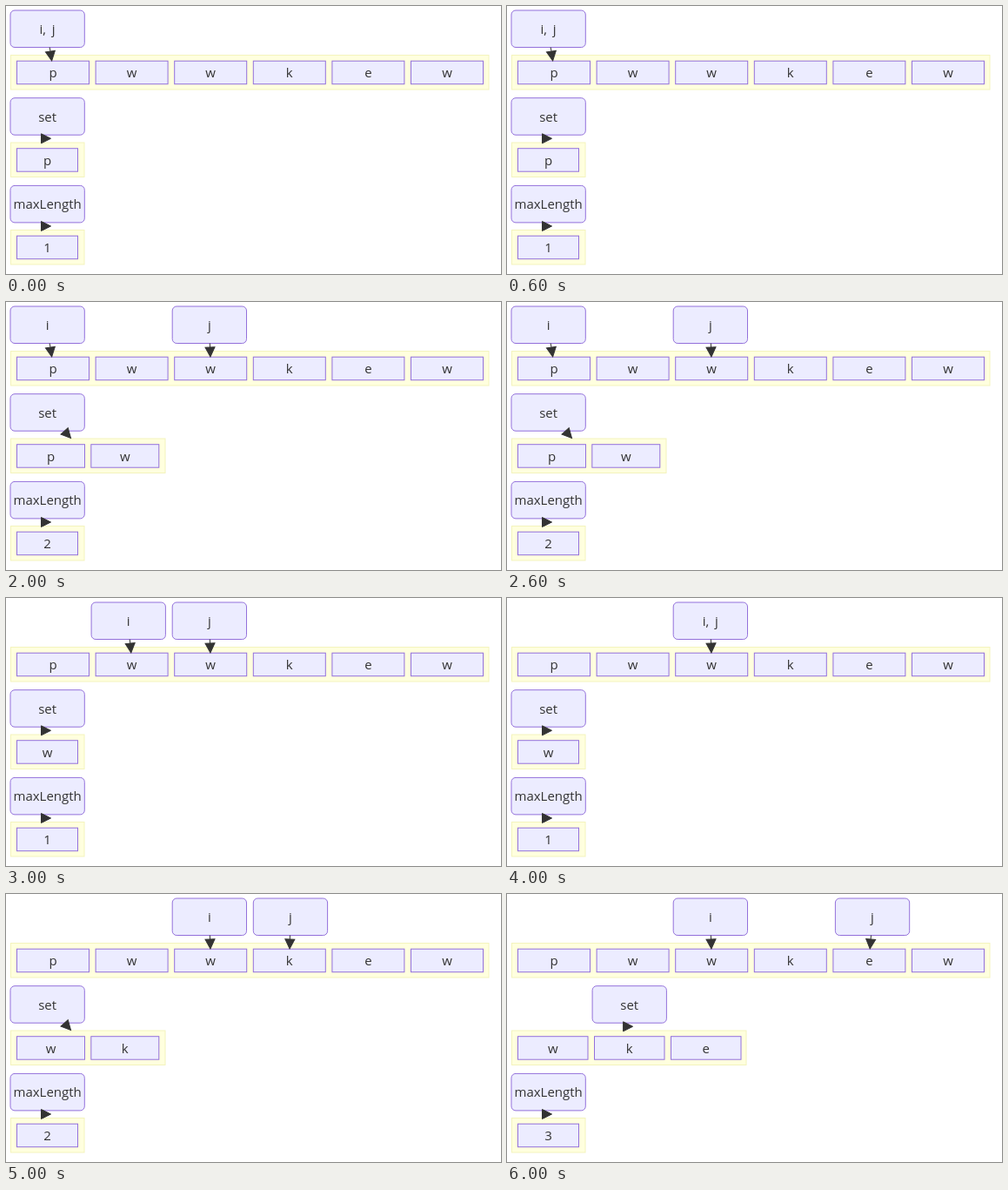
Animation of 569 by 308 pixels, one loop 7000 ms. Source, as an HTML page:

```html
<!DOCTYPE html>
<html lang="en">
<head>
<meta charset="utf-8">
<title>Sliding window</title>
<style>
html, body { margin: 0; width: 100%; height: 100%; overflow: hidden; background: #fff; }
svg { display: block; width: 569px; height: 308px; }
.node { fill: #ececff; stroke: #9370db; }
.group { fill: #ffffde; stroke: #f3f3bd; }
.edge { stroke: #333; }
.head { fill: #333; stroke: #333; }
text { font: 15px "Open Sans", "Noto Sans", sans-serif; fill: #333; text-anchor: middle; word-spacing: 3px; }
</style>
</head>
<body>
<svg id="stage" viewBox="0 0 569 308" width="569" height="308"></svg>
<script>
const stage = document.getElementById('stage');
const word = 'pwwkew';
const STEP = 1000;

// i and j are the window bounds, set holds its distinct letters
const steps = [
  { i: 0, j: 0, set: 'p', max: 1 },
  { i: 0, j: 1, set: 'pw', max: 2 },
  { i: 0, j: 2, set: 'pw', max: 2 },
  { i: 1, j: 2, set: 'w', max: 1 },
  { i: 2, j: 2, set: 'w', max: 1 },
  { i: 2, j: 3, set: 'wk', max: 2 },
  { i: 2, j: 4, set: 'wke', max: 3 }
];

// Cell layout by letter count: group width, cell width, distance between cells
const layouts = {
  1: [85, 70, 0],
  2: [178, 78, 85.3],
  3: [270, 80.5, 88],
  6: [550, 83, 90.6]
};

const boxX = col => 5 + 93.1 * col;

const rect = (kind, x, y, w, h, r = 0) =>
  `<rect class="${kind}" x="${x}" y="${y}" width="${w}" height="${h}" rx="${r}"/>`;

const label = (str, x, y) => `<text x="${x}" y="${y}">${str}</text>`;

const box = (str, col, y) =>
  rect('node', boxX(col), y, 85.3, 42.5, 5) + label(str, boxX(col) + 42.6, y + 27);

function row(letters, y) {
  const [total, w, gap] = layouts[letters.length];
  const cells = [...letters].map((ch, k) => {
    const x = 12.5 + gap * k;
    return rect('node', x, y + 6.7, w, 26.5) + label(ch, x + w / 2, y + 25.5);
  });
  return rect('group', 5.5, y, total - 0.5, 39.5) + cells.join('');
}

// Arrow head with its tip at (x, y), turned by angle
const head = (x, y, angle) =>
  `<path class="head" d="M0 0L-11 -5.5V5.5Z" transform="translate(${x} ${y}) rotate(${angle})"/>`;

function pointer(col) {
  const from = boxX(col) + 42.6;
  const shift = 54 + 90.6 * col - from;
  const x1 = from + shift * 0.4, x2 = from + shift * 0.78;
  const angle = Math.atan2(15.5, x2 - x1) * 180 / Math.PI;
  return `<path class="edge" d="M${x1} 47.5L${x2} 60"/>` + head(x2, 63, angle);
}

function scene({ i, j, set, max }) {
  const setCol = set.length === 3 ? 1 : 0;
  const setHead = set.length === 2
    ? head(74.5, 156.5, 48)
    : head(51.5 + 93.1 * setCol, 152.3, 0);
  const bounds = i === j
    ? box('i, j', i, 5)
    : box('i', i, 5) + box('j', j, 5);
  return row(word, 56.5) + row(set, 157) + row(String(max), 257.5) +
    bounds + box('set', setCol, 105.7) + box('maxLength', 0, 206.4) +
    pointer(i) + (i === j ? '' : pointer(j)) +
    setHead + head(51.5, 253, 0);
}

let shown = -1;
function draw(time) {
  const k = Math.floor(time / STEP) % steps.length;
  if (k !== shown) stage.innerHTML = scene(steps[shown = k]);
}

const start = performance.now();
function tick() {
  draw(performance.now() - start);
  requestAnimationFrame(tick);
}
tick();
</script>
</body>
</html>
```
